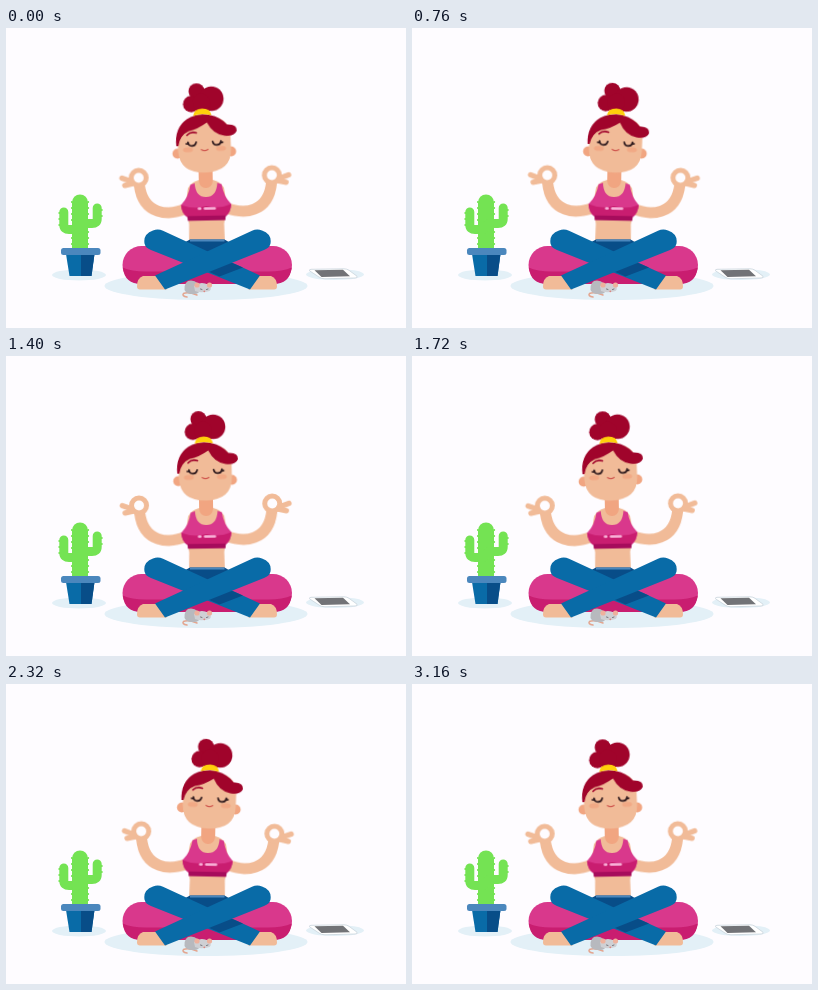
Recreate the animation shown at these times as an HTML page. Size 400 by 300 pixels, loop 3.2 s.

```html
<!DOCTYPE html>
<html lang="en">
<head>
<meta charset="utf-8">
<title>Meditation</title>
<style>
  html, body { margin: 0; width: 100%; height: 100%; overflow: hidden; background: #fefcff; }
  svg { display: block; width: 100vw; height: 100vh; }
  .sway { animation: sway 800ms cubic-bezier(.37, 0, .63, 1) infinite alternate; }
  .body { --tilt: 1.15deg; transform-origin: 201px 214px; }
  .head { --tilt: 1.4deg; transform-origin: 201px 148px; animation-delay: -1510ms; }
  @keyframes sway {
    from { transform: rotate(calc(-1 * var(--tilt))); }
    to { transform: rotate(var(--tilt)); }
  }
  .line { fill: none; stroke-linecap: round; stroke-linejoin: round; }
  .skin { fill: #f1bb98; }
  .blush { fill: #f1a581; }
  .limb { stroke: #f1bb98; }
  .hair { fill: #a0042b; }
  .pink { fill: #d9388c; }
  .rose { fill: #c91d70; }
  .shade { fill: #e3f0f7; }
  .jeans { fill: #096ba7; }
  .navy { fill: #084d88; }
  .cactus { stroke: #74e353; }
</style>
</head>
<body>
<svg viewBox="0 0 400 300">
  <defs>
    <g id="arm" class="line limb">
      <path d="M181 180C163 187.5 138 186 134.500 156" stroke-width="11"/>
      <circle cx="134" cy="148.500" r="7.500" stroke-width="5" fill="#fefcff"/>
      <path d="M127 152L117.300 148.500M128 154L120 155.800" stroke-width="5.400"/>
    </g>
    <path id="leg" class="jeans" d="M256 202.500Q266 206 264.500 215.500Q263.500 220 258 222L159 261.500L149 247.500L246 202.800Q251 200.500 256 202.500Z"/>
  </defs>

  <g class="shade">
    <ellipse cx="200" cy="258" rx="101.5" ry="14"/>
    <ellipse cx="73" cy="247" rx="27" ry="5.5"/>
    <ellipse cx="329" cy="246.5" rx="29" ry="5.5"/>
  </g>

  <!-- cactus -->
  <g class="line cactus">
    <path d="M74 174.500V221" stroke-width="16"/>
    <path d="M57.800 184V197Q57.800 201.500 63 201.500H72M91.200 180V191Q91.200 195.500 86 195.500H76" stroke-width="9"/>
    <path d="M65.900 174V218M82.200 174V218M53.300 185V200M95.800 182V194" stroke-width="2" stroke-dasharray="0 6"/>
  </g>
  <path class="jeans" d="M60 226H88.500L85.500 248H63.500Z"/>
  <path class="navy" d="M75 226H88.500L85.500 248H75Z"/>
  <rect x="55" y="220" width="39.5" height="7" rx="2.5" fill="#4b87bd"/>

  <!-- phone -->
  <path d="M305 241.3L338 240.8Q341 240.8 343 242.3L351 248.2Q352 250 349 250L319 250.8Q315 250.8 313 249L303.5 242.8Q303 241.4 305 241.3Z" fill="#fff" stroke="#ced8e0" stroke-width=".9"/>
  <path d="M308.500 242.300L337 241.800L344 248.300L315.500 249Z" fill="#727377"/>

  <!-- cushion -->
  <rect class="pink" x="116.500" y="218" width="169.500" height="38" rx="19"/>
  <path class="rose" d="M116.800 239.500Q125 243.500 140 243.500H262Q277 243.500 285.700 239.500Q284 256 267 256H135.500Q118.500 256 116.800 239.500Z"/>

  <!-- torso and head -->
  <g class="sway body">
    <use href="#arm"/>
    <use href="#arm" transform="matrix(-1 0 0 1 401.2 0)"/>
    <path class="skin" d="M194 138H208V152Q216 154 219 160L222 178L218.500 196L219 218H183L183.500 196L180 178L183 160Q186 154 194 152Z"/>
    <path class="blush" d="M194 140H208V153Q207 160 201 160Q195 160 194 153Z"/>
    <path class="pink" d="M185.500 156.500L189.800 155Q190.500 169 201 169Q211.500 169 212.500 155L216.700 156.500Q218.500 169 226 176.500Q225.500 185 219.800 189H182.300Q176 185 175.800 176.500Q183.500 169 185.500 156.500Z"/>
    <path class="rose" d="M175.800 176.500Q188 181.500 201 178Q214 181.500 226 176.500Q225.500 185 219.800 189H182.300Q176 185 175.800 176.500Z"/>
    <path d="M181.800 187.800H220.300L219.800 192.500H182.300Z" fill="#a60c5c"/>
    <path class="line" d="M193.500 180.500H195M199.500 180.500H209.500" stroke="#f9b3d9" stroke-width="2.400"/>

    <g class="sway head">
      <circle class="blush" cx="173.800" cy="124.500" r="5"/>
      <circle class="blush" cx="227.500" cy="124.500" r="5"/>
      <path class="skin" d="M174.500 108Q176 88 201 88Q227 88 227.500 108V122Q227 144.500 201 144.500Q175.500 144.500 174.500 122Z"/>
      <path class="hair" d="M173 117Q171.500 99 184.500 90.500Q201 82 217 91Q222 94 224.500 97.500Q234.500 97 234 104Q231.500 110 221.500 108.500Q210 106.500 204.500 94.500Q195 101 186 102.500Q177 106 175 117Z"/>
      <g class="hair">
        <circle cx="195.500" cy="63" r="8"/>
        <circle cx="210" cy="71" r="12.200"/>
        <circle cx="189.600" cy="75.500" r="8.200"/>
        <circle cx="200" cy="74.500" r="9"/>
      </g>
      <path d="M191 87.500Q192 80.500 200.300 80.500Q208.500 80.500 209.500 87.500Q200 84.500 191 87.500Z" fill="#ffd00b"/>
      <g class="blush" opacity=".8">
        <ellipse cx="184.500" cy="121" rx="5" ry="2.600"/>
        <ellipse cx="217.500" cy="121" rx="5" ry="2.600"/>
      </g>
      <g class="line" stroke="#261318" stroke-width="1.700">
        <path d="M184.800 113.500C185.500 118.700 191.800 118.700 193 113.800M209.500 113.800C210.500 118.700 217 118.700 217.800 113.500M185.500 115.500L183 115M217 115.500L219.500 115"/>
        <path d="M184 106.500Q187.500 102.800 193.500 104.500" stroke="#a0042b"/>
        <path d="M197.800 121.500Q201 123.800 204.500 121.500" stroke="#d0584f" stroke-width="1.200"/>
      </g>
    </g>
  </g>

  <!-- legs -->
  <path class="navy" d="M184 211.500H218.500L228 217L201 236L174 217Z"/>
  <path d="M184 211.500H218.500V213.500H184Z" fill="#4b87bd"/>
  <g class="skin">
    <path d="M137 248H156L161 261.500H134Q131 261.500 131 258.500Q131 250 137 248Z"/>
    <path d="M247 248H265Q271 250 271 258.500Q271 261.500 268 261.500H242Z"/>
  </g>
  <use href="#leg" transform="matrix(-1 0 0 1 403 0)"/>
  <path class="navy" d="M224 234L201 243L213.500 248.500L237 239.500Z"/>
  <use href="#leg"/>

  <!-- mouse -->
  <path class="line" d="M191 267Q182 263.500 177.500 265.500Q175.500 268 181 269" stroke="#e3a58f" stroke-width="1.500"/>
  <path d="M178.500 262Q178 252.500 185 252.500Q193 253 194.500 261Q193.500 266 188 266Q180.500 266.500 178.500 262Z" fill="#b7b9be"/>
  <path d="M188 258Q195 252.500 202.500 257Q206.500 260.500 203.500 263Q195 265.500 189 263Z" fill="#cfd0d4"/>
  <circle cx="191" cy="257" r="2.600" fill="#eeb19d"/>
  <circle cx="203.500" cy="257" r="2.600" fill="#eeb19d"/>
  <path class="line" d="M194.500 261L196 261.500M200.500 261.500L202 261" stroke="#5f6067" stroke-width=".8"/>
  <circle cx="198.300" cy="263.300" r=".9" fill="#df8580"/>
</svg>
</body>
</html>
```
